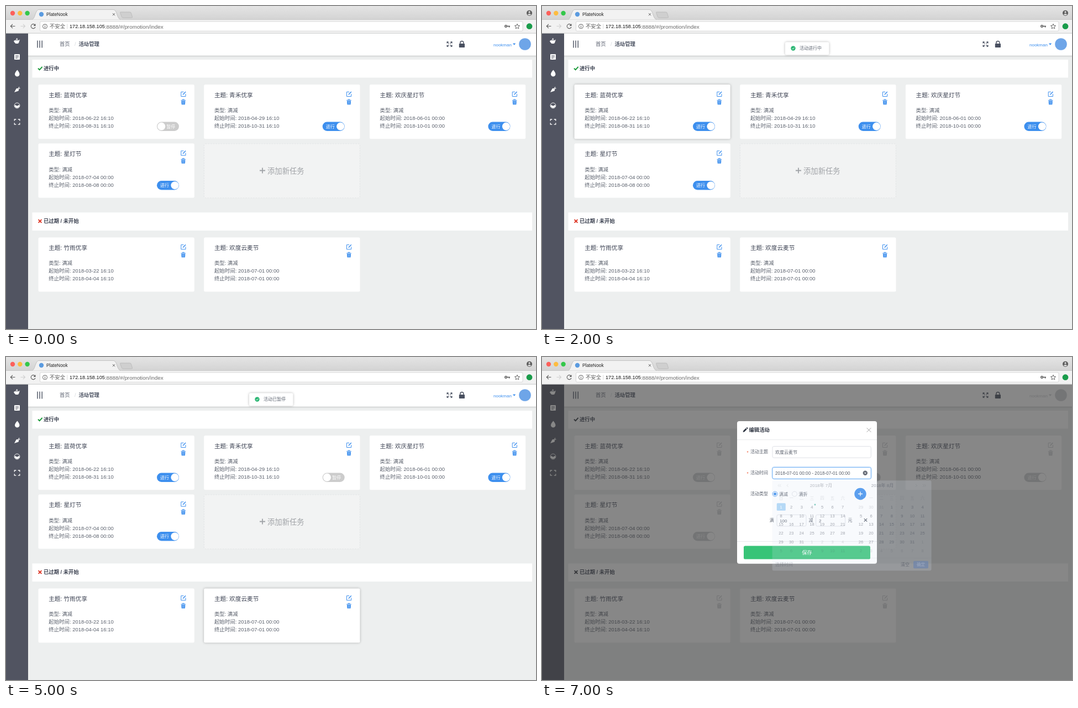
Write an HTML page that moves like this. It is 959x584 px and loops after 8000 ms.

```html
<!DOCTYPE html>
<html lang="zh-CN">
<head>
<meta charset="utf-8">
<title>PlateNook</title>
<style>
html, body { margin: 0; width: 100%; height: 100%; overflow: hidden; background: #edefef; }
svg { display: block; width: 100vw; height: 100vh; --acc: #3d8fee; --ok: #1c9a3a; --bad: #dd3322; --off: #cccccc; --face: #6ea5e8; }
svg.dim { --acc: #cfd1d4; --ok: #30343d; --bad: #30343d; --off: #cfd1d4; --face: #d0d2d6; }
text { font-family: "Liberation Sans", "Noto Sans CJK SC", "Noto Sans CJK", sans-serif; white-space: pre; }
.lift { filter: drop-shadow(0 .7px 2px rgba(0,0,0,.28)); }
</style>
</head>
<body>
<svg id="stage" viewBox="0 0 959 584" preserveAspectRatio="none"></svg>
<script>
const stage = document.getElementById('stage');
const INK = '#495060';

// Drawing helpers; text is placed by its vertical middle
const text = (x, mid, str, size, fill, more = '') =>
  `<text x="${x}" y="${(mid + size * .37).toFixed(2)}" font-size="${size}" fill="${fill}" ${more}>${str}</text>`;
const rect = (x, y, w, h, fill, more = '') =>
  `<rect x="${x}" y="${y}" width="${w}" height="${h}" fill="${fill}" ${more}/>`;
const circle = (x, y, r, fill, more = '') =>
  `<circle cx="${x}" cy="${y}" r="${r}" fill="${fill}" ${more}/>`;
const fillPath = (d, fill, more = '') => `<path d="${d}" fill="${fill}" ${more}/>`;
const line = (d, color, width = 1, more = '') =>
  `<path d="${d}" fill="none" stroke="${color}" stroke-width="${width}" ${more}/>`;
const group = (x, y, body, more = '') => `<g transform="translate(${x} ${y})" ${more}>${body}</g>`;
const cross = (x, y, r, color, width) =>
  line(`M${x - r} ${y - r}l${2 * r} ${2 * r}m0 ${-2 * r}l${-2 * r} ${2 * r}`, color, width);
const plus = (x, y, r, color, width) =>
  line(`M${x - r} ${y}h${2 * r}M${x} ${y - r}v${2 * r}`, color, width);
const BOLD = 'font-weight="600"';
const MIDDLE = 'text-anchor="middle"';

function browserBar() {
  const lights = ['#fc605b', '#fdbc40', '#34c84a'];
  return rect(0, 0, 959, 25, 'url(#strip)') +
    lights.map((c, i) => circle(12 + i * 13.3, 13, 4.2, c)).join('') +
    rect(0, 24, 959, 25.5, '#f2f2f2') +
    line('M0 24.5H46M206 24.5H959', '#bdbdbd', .8) +
    fillPath('M46 25C50 24 51 21 53 15Q56 6.5 59 6.5H194Q198 6.5 200.500 14Q203 24 208 25Z', '#f2f2f2', 'stroke="#b4b4b4" stroke-width=".7"') +
    rect(44, 24.9, 166, 2, '#f2f2f2') +
    fillPath('M207 11h17q2 0 2.500 2l2 6.500q.5 1.800-1.500 1.800h-15q-2 0-2.600-1.800l-2.600-6.700q-.5-1.800.200-1.800z', '#cfcfcf', 'stroke="#b3b3b3" stroke-width=".7"') +
    circle(64, 15, 4.2, '#5b9be0') +
    text(73, 15, 'PlateNook', 8.4, '#222') +
    cross(195, 15.2, 2.1, '#555', .9) +
    circle(947, 12.7, 5, '#5c5c5c') + circle(947, 11, 1.7, '#dcdcdc') +
    fillPath('M943.600 15.300q3.400-3 6.800 0q-3.400 3-6.800 0z', '#dcdcdc') +
    line('M16.500 36.500H8.300m3.700-3.700l-3.700 3.700l3.700 3.700', '#5a5a5a', 1.1) +
    line('M26.500 36.500h8m-3.600-3.700l3.600 3.700l-3.600 3.700', '#cfcfcf', 1.1) +
    line('M52.400 34.200A4 4 0 1 0 53 38', '#5a5a5a', 1.1) + fillPath('M53.500 32v4h-4z', '#5a5a5a') +
    rect(61.5, 28, 873.5, 17.3, '#fff', 'rx="2" stroke="#c9c9c9" stroke-width=".7"') +
    circle(70.5, 36.8, 4, 'none', 'stroke="#555" stroke-width=".9"') +
    line('M70.500 36.200v2.900M70.500 34.200v1', '#555', 1) +
    text(79, 37, '不安全', 9.33, '#5a5a5a') +
    line('M110.800 32.500v9', '#ccc', .7) +
    text(115, 37, '172.18.158.105', 9.2, '#111') +
    text(178.7, 37, ':8888/#/promotion/index', 9.9, '#6a6a6a') +
    circle(904.5, 36.5, 1.8, 'none', 'stroke="#5a5a5a" stroke-width="1.400"') +
    line('M906.300 36.500h5.700m-1.500 0v2.200', '#5a5a5a', 1.4) +
    line('M925 32.300l1.300 3l3.200.300l-2.400 2.200l.700 3.200l-2.800-1.700l-2.800 1.700l.7-3.200l-2.400-2.200l3.200-.3z', '#5a5a5a', .9) +
    circle(947, 36.7, 5.4, '#1a9c4b') +
    line('M0 49.200H959', '#b9b9b9', .7);
}

function sidebar() {
  const w = '#fff';
  return rect(0, 49, 40, 535, '#515461') +
    fillPath('M15.500 62h7.500l2-1.500l-1.500 5q-1 2.500-2.500 2.500h-3.500q-2.500-1.500-2.500-4zM17 61q2.500-2.500 5 0zM19 58.300h1.400v1.500h-1.400z', w) +
    line('M16 63q-2-.5-1.500 1.200t2.500 1.500', w, .8) +
    rect(15, 87, 10, 10, w, 'rx="1"') + line('M17 89.800h6M17 92h6M17 94.300h4', '#515461', .9) +
    fillPath('M20.500 115.500q4 5 4 7.800a4.200 4.200 0 0 1-8.500 0q0-3 4.500-7.800z', w) +
    fillPath('M15 156l3.500-6.500q2-1.500 3.800.3t.2 3.700z', w) +
    line('M22 149.500l2-3.200M22.500 150l3-1.500', w, 1.2) +
    circle(20, 180, 4.9, 'none', 'stroke="#fff" stroke-width=".9"') +
    fillPath('M15.200 180l2.500-1l2.300 2l2.500-2l2.300 1a4.900 4.900 0 0 1-9.600 0z', w) +
    line('M15.300 207.800v-2.800h3M21.800 205h3v2.800M24.800 211.300v2.800h-3M18.300 214.100h-3v-2.800', w, 1.3);
}

function header() {
  return rect(40, 89.5, 919, 1.3, '#000', 'opacity=".13"') + rect(40, 90.8, 919, 1.6, '#000', 'opacity=".05"') +
    rect(40, 49.5, 919, 40, '#fff') +
    line('M57 62.500v13M61 62.500v13M65.200 62.500v13', INK, 1.4) +
    text(97, 69, '首页', 9.33, '#5c6270') + text(124, 69, '/', 9.33, '#d5d8dd') +
    text(131.5, 69, '活动管理', 9.33, INK, BOLD) +
    [[1, 1], [-1, 1], [1, -1], [-1, -1]].map(([a, b]) =>
      `<g transform="translate(802.500 69) scale(${a} ${b})">${fillPath('M5 4.700h-3.700l3.700-3.700z', INK) + line('M1.200 1.100l2.700 2.600', INK, 1.3)}</g>`).join('') +
    rect(819.8, 68, 10.2, 7, INK, 'rx=".8"') + line('M821.900 68v-1.500a3 3 0 0 1 6 0v1.500', INK, 1.4) +
    text(882, 69.8, 'nookman', 8, 'var(--acc)') +
    fillPath('M917 67.500h5.200l-2.600 3.300z', 'var(--acc)') +
    circle(939, 69, 10.8, 'var(--face)');
}

function sections() {
  return rect(47.5, 97, 904.5, 32.5, '#fff') + rect(47.5, 373.3, 904.5, 32.7, '#fff') +
    line('M58 112.700l2.700 2.600l4.900-5.400', 'var(--ok)', 2) + text(68, 113, '进行中', 9.33, '#3b4150', BOLD) +
    cross(61.5, 389, 2.9, 'var(--bad)', 1.9) + text(68, 389, '已过期 / 未开始', 9.33, '#3b4150', BOLD);
}

const COL = [58.5, 358.2, 657.9];
const ROW = [142, 248.6, 418.4];
// column, row, name, start, end, has a switch
const cards = [
  [0, 0, '蓝荷优享', '2018-06-22 16:10', '2018-08-31 16:10', 1],
  [1, 0, '青禾优享', '2018-04-29 16:10', '2018-10-31 16:10', 1],
  [2, 0, '欢庆星灯节', '2018-06-01 00:00', '2018-10-01 00:00', 1],
  [0, 1, '星灯节', '2018-07-04 00:00', '2018-08-08 00:00', 1],
  [0, 2, '竹雨优享', '2018-03-22 16:10', '2018-04-04 16:10', 0],
  [1, 2, '欢度云麦节', '2018-07-01 00:00', '2018-07-01 00:00', 0]
];

function card([c, r, name, from, to, hasSwitch], i) {
  const a = 'var(--acc)';
  const body = rect(0, 0, 282.3, 98.2, '#fff', `rx="2.500" id="card${i}"`) +
    text(18.7, 18.6, '主题: ' + name, 10.67, '#3f4555', 'font-weight="500"') +
    text(18.7, 46.5, '类型: 满减', 9.4, '#5a606c') +
    text(18.7, 60.5, '起始时间: ' + from, 9.45, '#5a606c') +
    text(18.7, 74.6, '终止时间: ' + to, 9.45, '#5a606c') +
    line('M263 13.300h-4.700v8.200h8.200v-4.500', a, 1) + line('M261.600 18.300l5-5.200', a, 1.5) +
    line('M258 28.700h8.600M260.700 28.300v-1.300h3.200v1.300', a, 1) + fillPath('M258.700 29.800h7.200l-.5 6.400h-6.200z', a) +
    line('M261.200 31v4M263.400 31v4', '#fff', .5) +
    (hasSwitch ? `<g id="switch${i}">` + rect(214.5, 67.5, 40, 16.4, a, 'rx="8.200"') +
      circle(247, 75.7, 7.1, '#fff') + text(220.5, 75.9, '进行', 8, '#fff') + '</g>' : '');
  return group(COL[c], ROW[r], body);
}

const addCard = () =>
  rect(358.4, 249, 282, 98, '#f2f3f3', 'rx="2.500" stroke="#dfe1e2" stroke-width=".8" stroke-dasharray="2.600 2"') +
  plus(464, 297.5, 5, '#a0a3a7', 1.8) + text(473, 298, '添加新任务', 13.33, '#a0a3a7');

const toast = () => `<g id="toast">` +
  rect(440, 65.3, 79.4, 23, '#fff', 'rx="2.700" class="lift"') + circle(454.5, 76.5, 4.2, '#2bb673') +
  line('M452.500 76.600l1.500 1.500l2.600-2.900', '#fff', .9) +
  `<g id="note">${text(466, 76.5, '', 8, '#5f6672')}</g></g>`;

const field = (x, y, w, more = '') =>
  rect(x, y, w, 20.7, '#fff', `rx="2.700" stroke="#d7dae0" stroke-width=".8" ${more}`);

function dialog() {
  const g = '#5a606c', a = '#3d8fee';
  return rect(353, 116, 253, 257.7, '#fff', 'rx="4"') +
    fillPath('M363.600 136l.7-2.700l4.500-4.500l2 2l-4.500 4.500zM369.500 128.100l.8-.8q1-.4 1.800.5t.5 1.700l-.9.800z', '#2f3542') +
    text(374.5, 132, '编辑活动', 9.33, '#2f3542', BOLD) + cross(591.5, 132, 3.8, '#999', .9) +
    line('M353 149.600h253M353 333.500h253', '#e2e4e7', .8) +
    text(370.5, 172.5, '*', 8, '#ed3f14') + text(377, 171.3, '活动主题', 8, g) +
    field(417, 161.5, 178.3) + text(422, 171.8, '欢度云麦节', 8, g) +
    text(370.5, 210.500, '*', 8, '#ed3f14') + text(377, 209.5, '活动时间', 8, g) +
    field(417, 199.5, 178.3, 'id="dates"') + text(422, 210, '2018-07-01 00:00 - 2018-07-01 00:00', 8.15, g) +
    `<g id="calIcon">${rect(581, 206.5, 7.6, 7, 'none', `stroke="${g}" stroke-width=".8"`) + line('M581 208.200h7.600', g, 1.5) + line('M583 205.300v1.500M586.600 205.300v1.500', g, .8)}</g>` +
    `<g id="clearIcon">${circle(584.8, 209.8, 4.2, '#666b76') + cross(584.8, 209.8, 1.5, '#fff', .9)}</g>` +
    text(377, 247.3, '活动类型', 8, g) +
    circle(421.6, 247.6, 4.5, '#fff', `stroke="${a}" stroke-width=".9"`) + circle(421.6, 247.6, 2.7, a) + text(429, 247.6, '满减', 8, g) +
    circle(457, 247.6, 4.5, '#fff', 'stroke="#d7dae0" stroke-width=".8"') + text(464.5, 247.6, '满折', 8, g) +
    circle(576, 247.5, 10.7, a) + plus(576, 247.5, 4, '#fff', 1.3) +
    text(411.7, 295, '满', 8, g) + field(425, 285.2, 53) + text(430, 296.3, '100', 8, g) +
    text(482.6, 295, '减', 8, g) + field(495.6, 285.2, 53) + text(501, 296.3, '2', 8, g) +
    text(553.5, 295, '元', 8, g) + cross(585.5, 294.8, 2.7, '#555b68', 1.2) +
    rect(365, 341.6, 229, 24, '#37c477', 'rx="2.700"') + text(479.5, 353.3, '保存', 9.33, '#fff', MIDDLE);
}

// first: weekday column of day 1; before / days: lengths of previous and this month
function month(x, first, before, days) {
  let out = '';
  [...'日一二三四五六'].forEach((d, i) => { out += text(x + i * 18.6, 255, d, 7.5, '#495060', MIDDLE + ' opacity=".15"'); });
  for (let i = 0; i < 42; i++) {
    const day = i - first + 1, inside = day > 0 && day <= days;
    const n = day < 1 ? day + before : inside ? day : day - days;
    const chosen = inside && day === 1 && first === 0;
    out += text(x + i % 7 * 18.6, 271 + Math.floor(i / 7) * 15.75, n, 7.6, chosen ? '#fff' : '#3c4352', `${MIDDLE} opacity="${chosen ? 1 : inside ? .45 : .18}"`);
  }
  return out;
}

function picker() {
  const t = '#3c4352', soft = 'opacity=".3"';
  return rect(416.6, 223.3, 288, 163, '#dbe3f4', 'rx="2.700" opacity=".19"') +
    rect(424.8, 264.2, 16, 13.6, '#b5d9f6', 'rx="1.500"') + circle(494, 267, 1.4, '#4fb7a5', 'opacity=".7"') +
    text(505, 232.3, '2018年 7月', 8, t, MIDDLE + ' opacity=".35"') + text(616, 232.3, '2018年 8月', 8, t, MIDDLE + ' opacity=".45"') +
    `<g opacity=".15">${line('M429.500 230l-2.400 2.400l2.400 2.400M432.500 230l-2.400 2.400l2.400 2.400M445.500 230l-2.400 2.400l2.400 2.400M676 230l2.400 2.400l-2.400 2.400M689 230l2.400 2.400l-2.400 2.400M692 230l2.400 2.400l-2.400 2.400', t, .8)}</g>` +
    month(432.6, 0, 30, 31) + month(577, 3, 31, 31) +
    line('M416.600 363.500h288', t, .7, 'opacity=".08"') +
    text(422, 375.3, '选择时间', 8, t, soft) + text(649, 375.3, '清空', 8, t, 'opacity=".5"') +
    rect(672, 368.700, 27, 13.5, '#6680b0', 'rx="2" opacity=".6"') + text(685.5, 375.4, '确定', 7.6, '#c3cad8', MIDDLE + ' opacity=".5"');
}

stage.innerHTML =
  '<defs><linearGradient id="strip" x2="0" y2="1"><stop stop-color="#e4e4e4"/><stop offset="1" stop-color="#d3d3d3"/></linearGradient></defs>' +
  rect(0, 0, 959, 584, '#edefef') + sections() + cards.map(card).join('') + addCard() + header() + sidebar() + toast() +
  `<g id="modal">${rect(0, 49, 959, 535, '#373737', 'opacity=".6"') + dialog()}</g><g id="picker">${picker()}</g>` + browserBar();

const $ = id => document.getElementById(id);
const show = (id, on) => $(id).setAttribute('visibility', on ? 'visible' : 'hidden');
const noteText = $('note').firstChild;

function setSwitch(i, on) {
  const [pill, knob, label] = $('switch' + i).children;
  pill.setAttribute('fill', on ? 'var(--acc)' : 'var(--off)');
  knob.setAttribute('cx', on ? 247 : 222.7);
  label.setAttribute('x', on ? 220.5 : 231.7);
  label.textContent = on ? '进行' : '暂停';
}

function render(ms) {
  const step = Math.floor(ms % 8000 / 1000);
  const hover = { 2: 0, 3: 1, 4: 1, 5: 5 }[step];
  const modal = step >= 6, pick = step === 7, entering = step === 4;
  cards.forEach((_, i) => $('card' + i).setAttribute('class', i === hover ? 'lift' : ''));
  setSwitch(0, step >= 2);
  setSwitch(1, step < 4);
  show('toast', step >= 2 && !modal);
  noteText.textContent = step < 4 ? '活动进行中' : '活动已暂停';
  $('toast').setAttribute('transform', `translate(0 ${entering ? -11.2 : 0})`);
  $('toast').setAttribute('opacity', entering ? .5 : 1);
  stage.setAttribute('class', modal ? 'dim' : '');
  show('modal', modal);
  show('picker', pick);
  show('calIcon', modal && !pick);
  show('clearIcon', pick);
  $('dates').setAttribute('stroke', pick ? '#57a3f3' : '#d7dae0');
  $('dates').setAttribute('style', pick ? 'filter:drop-shadow(0 0 1px rgba(45,140,240,.5))' : '');
}

const start = performance.now();
let last = -1;
function tick() {
  const ms = performance.now() - start, step = Math.floor(ms / 1000);
  if (step !== last) render(ms);
  last = step;
  requestAnimationFrame(tick);
}
tick();
</script>
</body>
</html>
```
